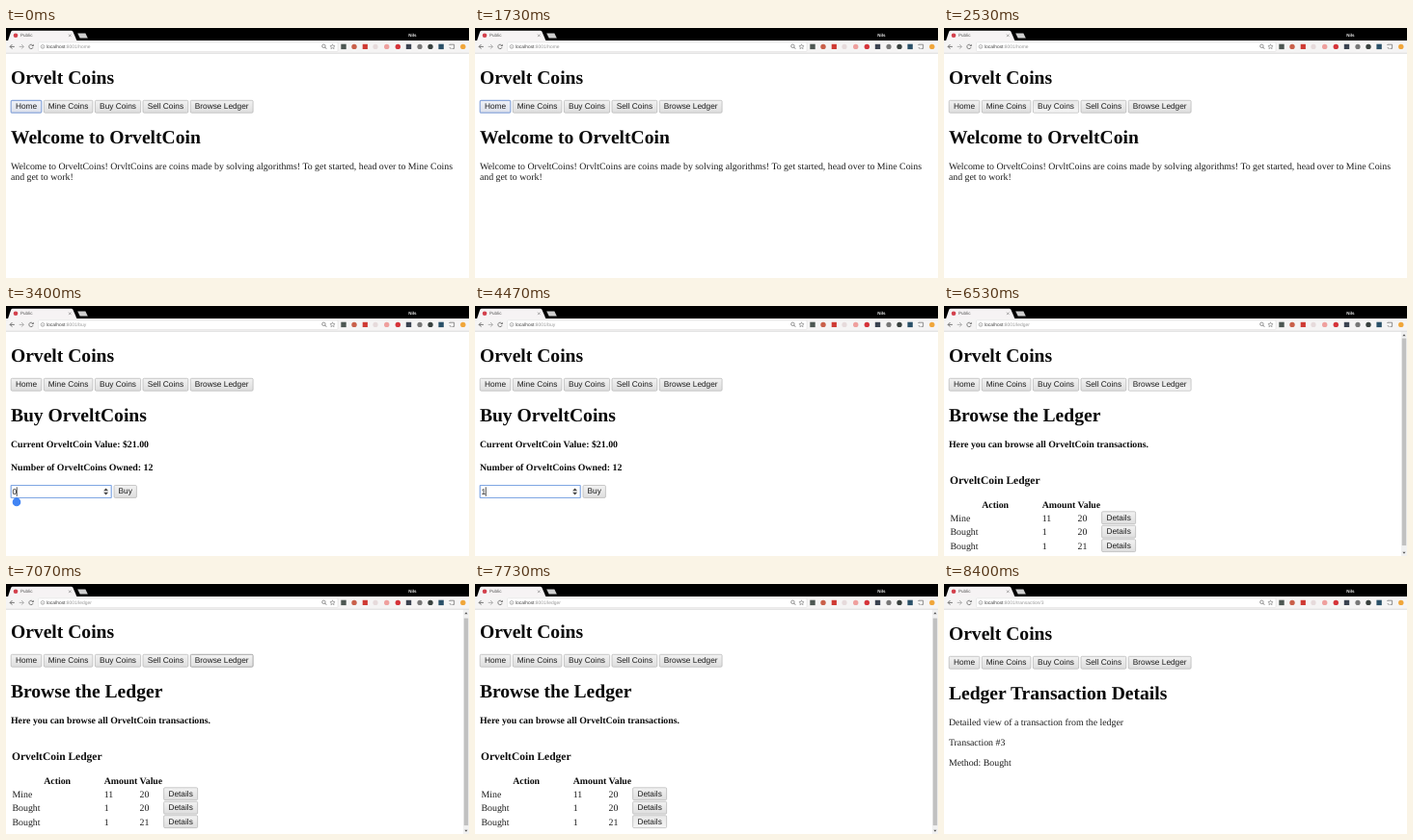
Recreate the animation shown at these times as an HTML page with a canvas. Size 480 by 260 pixels, loop 8.94 s.

```html
<!DOCTYPE html>
<html lang="en">
<head>
<meta charset="utf-8">
<title>Public</title>
<style>
html, body { margin: 0; width: 100%; height: 100%; overflow: hidden; background: #fff; }
canvas { display: block; width: 480px; height: 260px; }
</style>
</head>
<body>
<canvas id="stage"></canvas>
<script>
const LOOP = 8940;
const SERIF = '"Liberation Serif", "Times New Roman", serif';
const SANS = '"Liberation Sans", Arial, sans-serif';
const BASE = 9.86, H1 = 19.6, H3 = 11.5, UI = 8.3;

const canvas = document.getElementById('stage');
const ratio = window.devicePixelRatio || 1;
canvas.width = 480 * ratio;
canvas.height = 260 * ratio;
const ctx = canvas.getContext('2d');
ctx.scale(ratio, ratio);
ctx.textRendering = 'geometricPrecision';

function rect(x, y, w, h, color) {
  ctx.fillStyle = color;
  ctx.fillRect(x, y, w, h);
}

function disc(x, y, r, color) {
  ctx.fillStyle = color;
  ctx.beginPath();
  ctx.arc(x, y, r, 0, Math.PI * 2);
  ctx.fill();
}

function ring(x, y, r, color, width = 0.8, from = 0, to = Math.PI * 2) {
  ctx.strokeStyle = color;
  ctx.lineWidth = width;
  ctx.beginPath();
  ctx.arc(x, y, r, from, to);
  ctx.stroke();
}

function poly(points, color) {
  ctx.fillStyle = color;
  ctx.beginPath();
  points.forEach(([x, y]) => ctx.lineTo(x, y));
  ctx.fill();
}

function line(points, color, width = 0.9) {
  ctx.strokeStyle = color;
  ctx.lineWidth = width;
  ctx.beginPath();
  points.forEach(([x, y], i) => i ? ctx.lineTo(x, y) : ctx.moveTo(x, y));
  ctx.stroke();
}

function text(str, x, y, font, color = '#000', align = 'left') {
  ctx.font = font;
  ctx.fillStyle = color;
  ctx.textAlign = align;
  ctx.fillText(str, x, y);
}

const plain = (str, x, y) => text(str, x, y, `${BASE}px ${SERIF}`, '#1c1c1c');
const bold = (str, x, y, size = BASE) => text(str, x, y, `bold ${size}px ${SERIF}`, '#0a0a0a');

function roundBox(x, y, w, h, r, fill, stroke, width) {
  ctx.beginPath();
  ctx.roundRect(x, y, w, h, r);
  ctx.fillStyle = fill;
  ctx.fill();
  ctx.strokeStyle = stroke;
  ctx.lineWidth = width;
  ctx.stroke();
}

const BUTTON = {
  idle: ['#f2f2f2', '#dedede', '#b4b4b4', 0.7],
  hover: ['#f4f4f4', '#e0e0e0', '#959595', 0.8],
  press: ['#e8e8e8', '#f4f4f4', '#b8b8b8', 0.7],
  focus: ['#eff1f7', '#dde1ec', '#8ba7da', 1.2]
};

function button(label, x, y, w, state = 'idle') {
  const [top, bottom, edge, width] = BUTTON[state];
  const h = 12.9;
  const fill = ctx.createLinearGradient(0, y, 0, y + h);
  fill.addColorStop(0, top);
  fill.addColorStop(1, bottom);
  roundBox(x, y, w, h, 1.2, fill, edge, width);
  text(label, x + w / 2, y + 8.8, `${UI}px ${SANS}`, '#1c1c1c', 'center');
}

function extensions() {
  const y = 19.4;
  rect(347.3, 16.7, 5.4, 5.4, '#4d5752');
  disc(361, y, 2.7, '#c9604a');
  rect(369.7, 16.8, 5.2, 5.2, '#cf3a33');
  disc(383, y, 2.6, '#e6dadb');
  disc(394.7, y, 2.7, '#efa09e');
  disc(406.3, y, 2.7, '#d5343a');
  rect(414.8, 16.8, 5.4, 5.2, '#3a4250');
  disc(429, y, 2.6, '#777');
  disc(440, y, 2.7, '#38403e');
  rect(448.4, 16.7, 5.4, 5.4, '#2a5068');
  line([[459.8, 18], [459.8, 17.2], [464.6, 17.2], [464.6, 21.4], [462.5, 21.4]], '#777', 0.8);
  ring(459.7, 22, 1.6, '#777', 0.7, -Math.PI / 2, 0);
  disc(473.8, y, 2.7, '#f0a63a');
}

function browser(path) {
  rect(0, 0, 480, 13, '#000');
  poly([[2, 13.2], [5.3, 3.4], [6.5, 2.8], [68, 2.8], [69.3, 3.4], [73.5, 13.2]], '#f6f3f4');
  disc(10, 7.8, 2.3, '#d3404c');
  text('Public', 15, 9.4, `4.6px ${SANS}`, '#555');
  line([[65, 6.5], [67.6, 9.1]], '#777', 0.6);
  line([[67.6, 6.5], [65, 9.1]], '#777', 0.6);
  poly([[74.2, 5.4], [82.4, 5.4], [84.8, 10.6], [76.7, 10.6]], '#cfcfcf');
  text('Nils', 421.5, 9.3, `bold 4.5px ${SANS}`, '#eee', 'center');

  rect(0, 13, 480, 13, '#f5f4f4');
  rect(0, 25.8, 480, 0.8, '#d2d2d2');
  line([[8.8, 19.4], [4.2, 19.4]], '#666');
  line([[6.4, 17.1], [4.1, 19.4], [6.4, 21.7]], '#666');
  line([[13.7, 19.4], [18.3, 19.4]], '#aaa');
  line([[16.1, 17.1], [18.4, 19.4], [16.1, 21.7]], '#aaa');
  ring(26, 19.4, 2.2, '#666', 0.8, 0.3, 5.4);
  poly([[28.7, 16.8], [28.7, 19.1], [26.4, 19.1]], '#666');

  roundBox(33.5, 14.8, 310.5, 9.7, 1, '#fff', '#dadada', 0.5);
  ring(38, 19.4, 1.9, '#888', 0.6);
  rect(37.7, 19, 0.6, 1.6, '#888');
  const font = `4.95px ${SANS}`;
  text('localhost', 42, 21.1, font, '#444');
  text(':8001/' + path, 42 + ctx.measureText('localhost').width, 21.1, font, '#999');
  ring(329.4, 18.8, 1.7, '#666', 0.7);
  line([[330.6, 20], [332.2, 21.7]], '#666', 0.9);

  const star = [];
  for (let i = 0; i <= 10; i++) {
    const a = i * Math.PI / 5 - Math.PI / 2, r = i % 2 ? 1.2 : 2.7;
    star.push([338.5 + r * Math.cos(a), 19.5 + r * Math.sin(a)]);
  }
  line(star, '#777', 0.6);
  extensions();
}

const NAV = [
  ['Home', 5.2, 31.6], ['Mine Coins', 39.3, 50.6], ['Buy Coins', 92.4, 47.2],
  ['Sell Coins', 142, 46.8], ['Browse Ledger', 191.3, 64.8]
];

function header(title, active, state) {
  bold('Orvelt Coins', 4.9, 57.7, H1);
  NAV.forEach(([label, x, w], i) => button(label, x, 75.3, w, i === active ? state : 'idle'));
  bold(title, 4.9, 119.7, H1);
}

function home(t) {
  const leaving = t >= 2530;
  header('Welcome to OrveltCoin', leaving ? 2 : 0, leaving ? 'press' : 'focus');
  plain('Welcome to OrveltCoins! OrvltCoins are coins made by solving algorithms! To get started, head over to Mine Coins', 4.9, 146.5);
  plain('and get to work!', 4.9, 157.8);
}

function field(t) {
  const focused = t >= 3400 && t < 4930;
  roundBox(5.2, 186.5, 104, 13, 0.4, '#fff', focused ? '#7fa6e3' : '#c6c6c6', focused ? 1.2 : 0.7);
  const value = t < 4330 ? '0' : t < 4470 ? '' : '1';
  text(value, 6.4, 195.8, `${UI}px ${SANS}`, '#1c1c1c');
  if (!focused) return;

  poly([[101.1, 192.2], [103.6, 189.4], [106.1, 192.2]], '#444');
  poly([[101.1, 193.8], [103.6, 196.6], [106.1, 193.8]], '#444');
  const caret = t < 3730 || t >= 4270;
  if (caret) rect(value ? 10.8 : 6.6, 188.3, 0.7, 9.6, '#000');
  if (t < 4330) {
    poly([[11, 198.7], [14.3, 201.6], [7.7, 201.6]], '#4285f4');
    disc(11, 203.9, 4.3, '#4285f4');
  }
}

function buy(t) {
  header('Buy OrveltCoins', t < 3400 ? 2 : -1, t < 2670 ? 'press' : 'focus');
  const done = t >= 5130;
  bold(`Current OrveltCoin Value: $${done ? 22 : 21}.00`, 4.9, 146.5);
  bold(`Number of OrveltCoins Owned: ${done ? 13 : 12}`, 4.9, 170.9);
  field(t);
  button('Buy', 112, 186.5, 23.4, t < 4930 ? 'idle' : t < 5000 ? 'press' : 'hover');
}

function scrollbar(offset) {
  rect(474, 26.6, 6, 233.4, '#f1f1f1');
  rect(474.8, 33.6 + offset, 4.4, 215.5, '#c1c1c1');
  poly([[475.4, 31.2], [477, 29.3], [478.6, 31.2]], '#555');
  poly([[475.4, 255.8], [477, 257.7], [478.6, 255.8]], '#555');
}

const ROWS = [['Mine', 11, 20], ['Bought', 1, 20], ['Bought', 1, 21]];

function ledger(t) {
  const offset = t < 7000 ? 0 : t < 7070 ? 1 : 2;
  ctx.save();
  ctx.beginPath();
  ctx.rect(0, 26.6, 480, 233.4);
  ctx.clip();
  ctx.translate(0, -offset);
  header('Browse the Ledger', t < 7730 ? 4 : -1, t < 6670 ? 'press' : 'hover');
  bold('Here you can browse all OrveltCoin transactions.', 4.9, 146.5);
  bold('OrveltCoin Ledger', 6, 185.2, H3);
  bold('Action', 39.2, 210.2);
  bold('Amount', 101.7, 210.2);
  bold('Value', 138.5, 210.2);
  ROWS.forEach(([action, amount, value], i) => {
    const y = 223.6 + i * 14.45;
    plain(action, 6.5, y);
    plain(amount, 101.7, y);
    plain(value, 138.5, y);
    button('Details', 163.6, y - 9.8, 35, t >= 7730 && i === 2 ? 'press' : 'idle');
  });
  ctx.restore();
  scrollbar(offset);
}

function details() {
  header('Ledger Transaction Details', -1);
  plain('Detailed view of a transaction from the ledger', 4.9, 146.5);
  plain('Transaction #3', 4.9, 167.7);
  plain('Method: Bought', 4.9, 188.9);
}

const PAGES = [
  [2600, 'home', home],
  [6530, 'buy', buy],
  [7800, 'ledger', ledger],
  [LOOP, 'transaction/3', details]
];

function draw(t) {
  rect(0, 0, 480, 260, '#fff');
  const [, path, page] = PAGES.find(([end]) => t < end);
  page(t);
  browser(path);
}

const start = performance.now();
function tick() {
  draw((performance.now() - start) % LOOP);
  requestAnimationFrame(tick);
}
tick();
</script>
</body>
</html>
```
